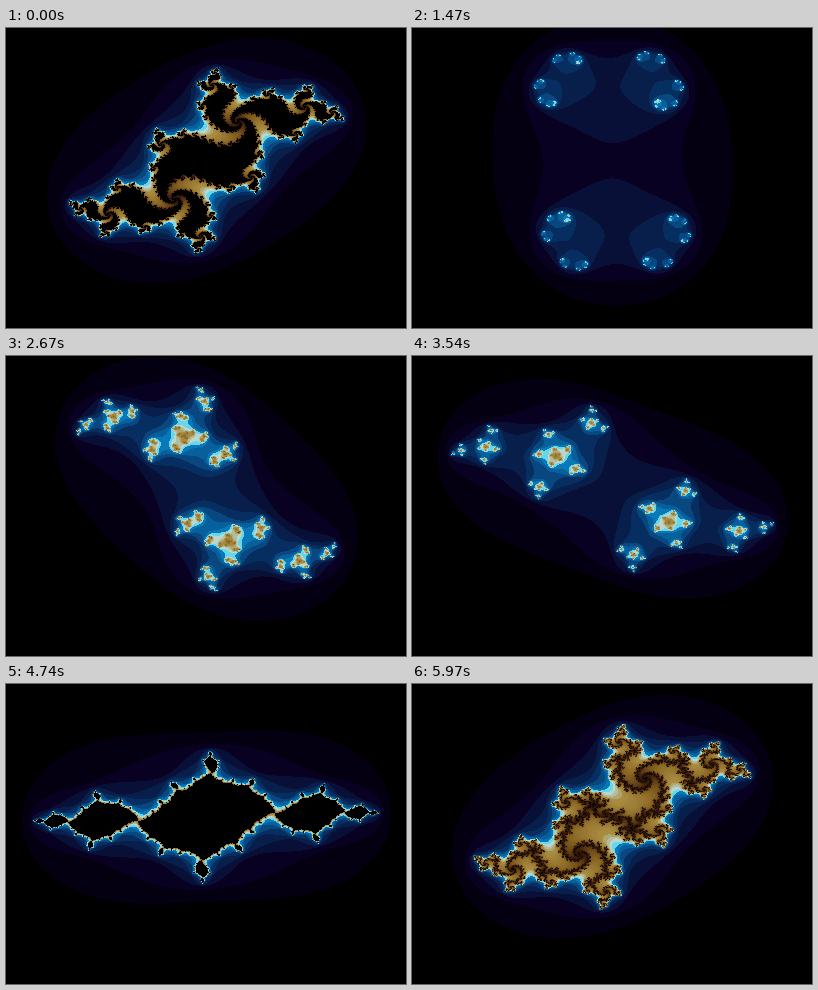
Write an HTML page with a canvas that moves like this. It is 400 px wide and 300 px high and loops after 6000 ms.

```html
<!DOCTYPE html>
<html lang="en">
<head>
<meta charset="utf-8">
<title>Julia set</title>
<style>
  html, body { margin: 0; width: 100%; height: 100%; overflow: hidden; background: #000; }
  canvas { display: block; width: 400px; height: 300px; }
</style>
</head>
<body>
<canvas id="stage" width="400" height="300"></canvas>
<script>
const W = 400, H = 300;
const LOOP = 6000, STEP = 30;
const MAX_ITER = 100;
const VIEW = { left: -1.9, right: 1.9, top: -1.5, bottom: 1.9 };

// Key colours by escape count: night, blue, cyan, pale, gold, brown, black
const KEYS = {
  1: "#000000", 3: "#090122", 6: "#072e61", 9: "#0878b9", 10: "#64d7eb",
  11: "#b9d7cd", 14: "#aa8c41", 24: "#825f1e", 40: "#3c1c0a", 100: "#000000"
};

const ctx = document.getElementById("stage").getContext("2d");
const image = ctx.createImageData(W, H);
const pixels = new Uint32Array(image.data.buffer);
const palette = makePalette();

// Paint the gradient one pixel per count and read it back.
function makePalette() {
  const strip = document.createElement("canvas");
  strip.width = MAX_ITER + 1;
  strip.height = 1;
  const pen = strip.getContext("2d");
  const gradient = pen.createLinearGradient(0.5, 0, MAX_ITER + 0.5, 0);
  for (const [n, colour] of Object.entries(KEYS)) gradient.addColorStop(n / MAX_ITER, colour);
  pen.fillStyle = gradient;
  pen.fillRect(0, 0, strip.width, 1);
  return new Uint32Array(pen.getImageData(0, 0, strip.width, 1).data.buffer);
}

function escapeCount(x, y, cx, cy) {
  let n = 0, xx = x * x, yy = y * y;
  while (n < MAX_ITER && xx + yy <= 4) {
    y = 2 * x * y + cy;
    x = xx - yy + cx;
    xx = x * x;
    yy = y * y;
    n++;
  }
  return n;
}

// The parameter c travels round an ellipse once per loop.
function draw(phase) {
  const a = phase * 2 * Math.PI;
  const cx = -0.2 + 0.9 * Math.sin(a);
  const cy = -0.1 + 0.8 * Math.cos(a);
  const dx = (VIEW.right - VIEW.left) / W;
  const dy = (VIEW.bottom - VIEW.top) / H;
  for (let j = 0, p = 0; j < H; j++) {
    const y = VIEW.top + j * dy;
    for (let i = 0; i < W; i++) {
      pixels[p++] = palette[escapeCount(VIEW.left + i * dx, y, cx, cy)];
    }
  }
  ctx.putImageData(image, 0, 0);
}

const start = performance.now();
let shown = -1;

function tick() {
  const step = Math.floor(((performance.now() - start) % LOOP) / STEP);
  if (step !== shown) {
    shown = step;
    draw(step * STEP / LOOP);
  }
  requestAnimationFrame(tick);
}
tick();
</script>
</body>
</html>
```
